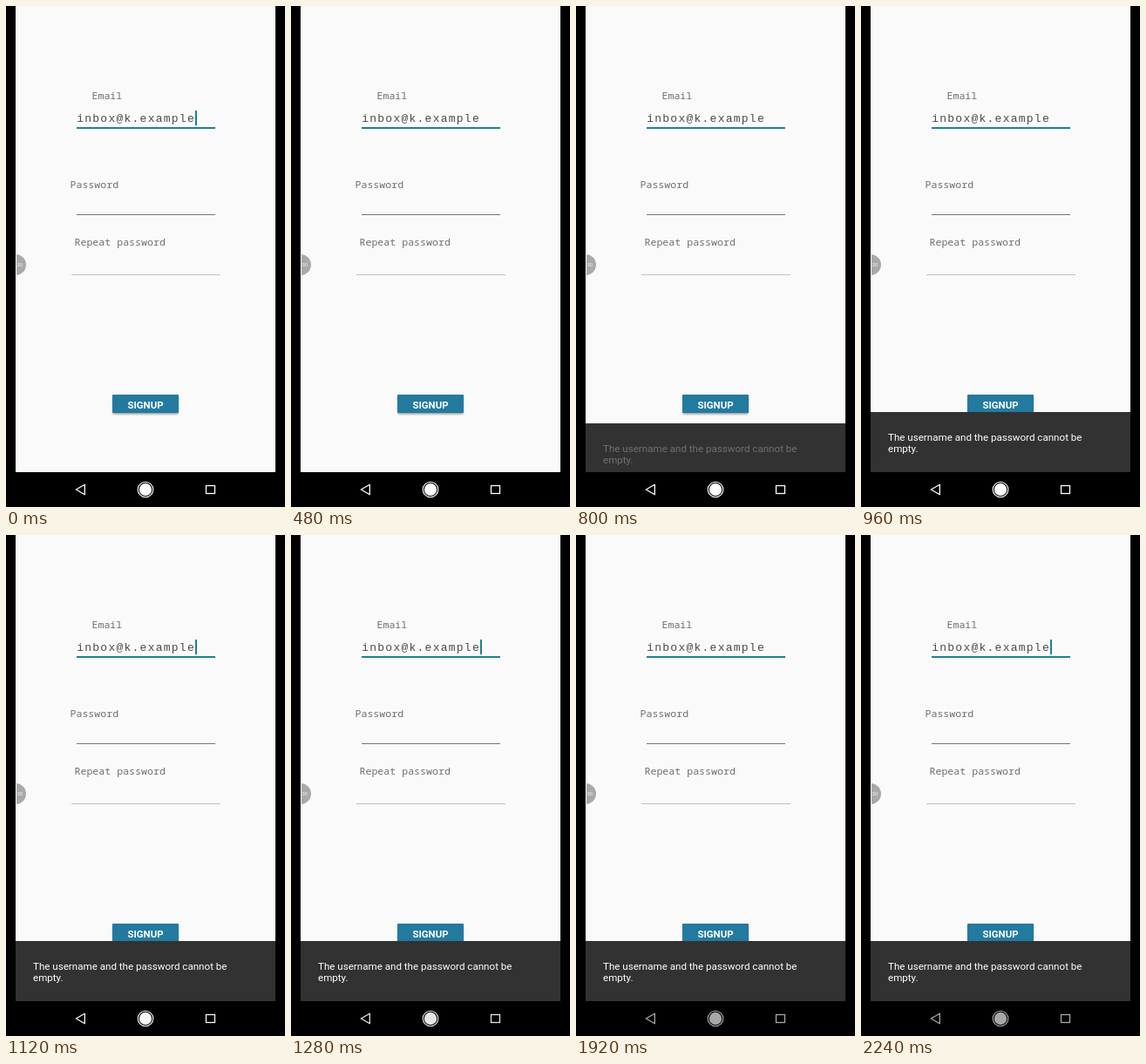
An HTML page for the animation above (2400 ms loop, 320 by 575 pixels).

```html
<!DOCTYPE html>
<html lang="en">
<head>
<meta charset="utf-8">
<title>Signup form</title>
<style>
  html, body { margin: 0; width: 100%; height: 100%; overflow: hidden; background: #000; }
  svg { display: block; width: 100%; height: 100%; }
  text { white-space: pre; }
  .label { font: 11.6px "Noto Sans Mono", "DejaVu Sans Mono", monospace; fill: #6e6e6e; }
  .input { font: 13px "Liberation Mono", monospace; letter-spacing: 1.25px; fill: #4a4a4a; }
  .button { font: 700 11.4px Roboto, sans-serif; fill: #fff; text-anchor: middle; }
  .message { font: 11.6px Roboto, sans-serif; fill: #fff; }
  .badge { font: 6px Roboto, sans-serif; fill: #f4f4f4; }
  #touch, #snack { opacity: 0; }
</style>
</head>
<body>
<svg viewBox="0 0 320 575">
  <defs>
    <clipPath id="screen"><rect x="11" width="298" height="535"/></clipPath>
    <clipPath id="edge"><rect x="12" y="280" width="20" height="34"/></clipPath>
    <filter id="soft" x="-10%" y="-30%" width="120%" height="170%">
      <feGaussianBlur stdDeviation=".8"/>
    </filter>
  </defs>
  <rect width="320" height="575"/>

  <g clip-path="url(#screen)">
    <rect x="11" width="298" height="535" fill="#fafafa"/>

    <text class="label" x="98.5" y="107">Email</text>
    <text class="input" x="81.2" y="132.5">inbox@k.example</text>
    <rect id="cursor" x="217" y="120" width="2" height="17" fill="#1f8094"/>
    <rect x="81" y="139" width="159" height="2" fill="#1f8094"/>

    <text class="label" x="73.5" y="209">Password</text>
    <rect x="81" y="239" width="159" height="1" fill="#777"/>

    <text class="label" x="78.5" y="275">Repeat password</text>
    <rect x="75" y="308" width="171" height="1" fill="#c2c2c2"/>

    <g clip-path="url(#edge)">
      <circle cx="11" cy="297" r="12" fill="#a9a9a9"/>
      <text class="badge" x="12.5" y="299">30</text>
    </g>

    <rect x="122.5" y="448" width="75" height="20.5" fill="#000" opacity=".4" filter="url(#soft)"/>
    <rect x="122" y="446" width="76" height="21" rx=".8" fill="#237a9f"/>
    <text class="button" x="160" y="461.5">SIGNUP</text>
    <circle id="touch" cx="165" cy="460" r="9" fill="#dcdcdc"/>

    <g id="snack">
      <rect x="11" y="466" width="298" height="69" fill="#323232"/>
      <g id="message" class="message">
        <text x="31" y="498.5">The username and the password cannot be</text>
        <text x="31" y="512">empty.</text>
      </g>
    </g>
  </g>

  <g id="nav" fill="none" stroke="#fff" stroke-width="1.3">
    <path d="M80.3 555 90.3 549.2V560.8Z" stroke-linejoin="round"/>
    <circle cx="160" cy="555" r="8.8" stroke-width="1.1"/>
    <circle cx="160" cy="555" r="7.2" fill="#fff" stroke="none"/>
    <rect x="229.5" y="550.5" width="10" height="9"/>
  </g>
</svg>
<script>
const LOOP = 2400;

// Each step is [time in ms, value], held until the next one.
function play(id, prop, steps) {
  const frames = steps.map(([ms, value]) => ({
    offset: ms / LOOP, [prop]: value, easing: "step-end"
  }));
  frames.push({ offset: 1, [prop]: steps[steps.length - 1][1] });
  document.getElementById(id).animate(frames, { duration: LOOP, iterations: Infinity });
}

play("cursor", "opacity", [[0, 1], [480, 0], [1120, 1], [1600, 0], [2080, 1]]);
play("touch", "opacity", [[0, 0], [640, .7], [800, 0]]);
play("snack", "opacity", [[0, 0], [800, 1]]);
play("snack", "transform", [[0, "translateY(69px)"], [800, "translateY(13px)"], [960, "translateY(0px)"]]);
play("message", "opacity", [[0, 0], [800, .3], [960, 1]]);
play("nav", "opacity", [[0, 1], [1120, .97], [1280, .9], [1440, .8], [1600, .71], [1760, .66]]);
</script>
</body>
</html>
```
